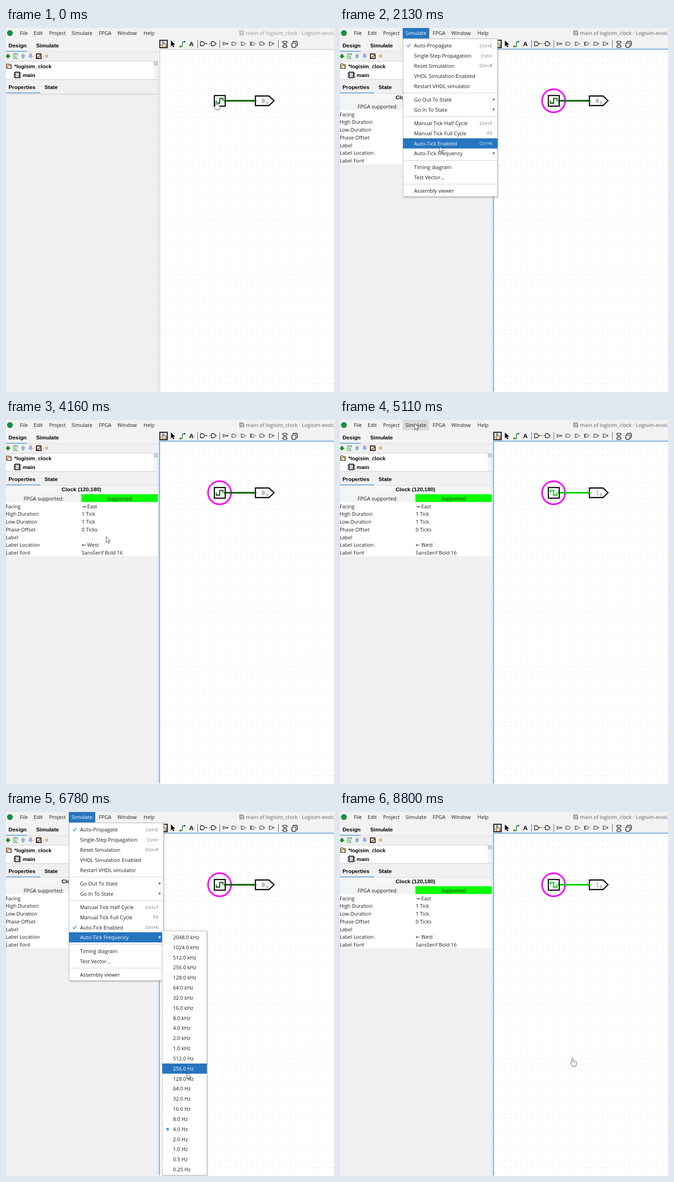
These frames come from a looping animation (711 by 787 pixels, 8870 ms). An HTML page with a canvas:

```html
<!DOCTYPE html>
<html lang="en">
<head>
<meta charset="utf-8">
<title>Clock simulation</title>
<style>
html, body { margin: 0; width: 100%; height: 100%; overflow: hidden; background: #f0f0f0; }
canvas { display: block; }
</style>
</head>
<body>
<canvas id="stage" width="711" height="787"></canvas>
<script>
const g = document.getElementById('stage').getContext('2d');
const LOOP = 8870;
const UI = '"Open Sans", "Noto Sans", "DejaVu Sans", sans-serif';
const BOLD = '"Liberation Sans", Arial, sans-serif';
const BLUE = '#2675bf', FOCUS = '#89b7e0', ROW = 21.83;

// Cursor path: time, x, y
const PATH = [
  [0, 455, 159], [660, 455, 159], [1190, 230, 35], [1400, 180, 6], [1530, 166, 2], [1600, 168, 3],
  [1810, 168, 3], [2000, 200, 150], [2130, 216, 256], [2300, 222, 270], [2540, 221, 268],
  [2690, 217, 252], [4620, 217, 252], [5110, 162, 8], [5240, 162, 8], [5440, 176, 98],
  [5700, 195, 190], [6030, 218, 269], [6370, 229, 271], [6570, 340, 280], [6780, 392, 564],
  [6920, 390, 622], [7200, 388, 633], [7660, 386, 635], [7930, 500, 590], [8100, 558, 548],
  [8270, 504, 532], [LOOP, 504, 532]
];
const FAST_TICKS = [7730, 7800, 7870, 7930, 8070, 8130, 8200, 8270, 8470, 8540, 8600, 8670, 8800];

const MENUS = [['File', 30], ['Edit', 60], ['Project', 93.5], ['Simulate', 142], ['FPGA', 201], ['Window', 241.5], ['Help', 298]];
// Label, row centre, shortcut ('>' opens a submenu)
const ITEMS = [
  ['Auto-Propagate', 38, 'Ctrl+E'], ['Single-Step Propagation', 60, 'Ctrl+I'],
  ['Reset Simulation', 81.5, 'Ctrl+R'], ['VHDL Simulation Enabled', 103.5, ''],
  ['Restart VHDL simulator', 125.5, ''], ['Go Out To State', 155, '>'], ['Go In To State', 176.5, '>'],
  ['Manual Tick Half Cycle', 206, 'Ctrl+T'], ['Manual Tick Full Cycle', 227.5, 'F9'],
  ['Auto-Tick Enabled', 249.5, 'Ctrl+K'], ['Auto-Tick Frequency', 271, '>'],
  ['Timing diagram', 301, ''], ['Test Vector...', 322.5, ''], ['Assembly viewer', 352, '']
];
const PROPS = [['Facing', '→ East'], ['High Duration', '1 Tick'], ['Low Duration', '1 Tick'],
  ['Phase Offset', '0 Ticks'], ['Label', ''], ['Label Location', '← West'], ['Label Font', 'SansSerif Bold 16']];

const ARROW = 'M0 0V12.8L3 10L5.2 14.8L7.3 13.9L5.2 9.3H9.3Z';
const HAND = 'M-1.6 10.5V1.5Q0 -1 1.5 1.5V7Q3 5.5 4 7.5Q5.5 6 6.5 8Q8.5 7.5 8.5 9.5V13Q8.3 15.5 7 17.8H0Q-2 15 -4.5 11.5Q-4.2 9 -1.6 10.5Z';
const AND = 'M0 -4H4Q9 -4 9 0T4 4H0Z';
const OR = 'M0 -4H3Q7 -3.5 9 0Q7 3.5 3 4H0Q3 0 0 -4Z';

function rect(x, y, w, h, color) {
  g.fillStyle = color;
  g.fillRect(x, y, w, h);
}
function frame(x, y, w, h, color, width = 1) {
  g.strokeStyle = color;
  g.lineWidth = width;
  g.strokeRect(x, y, w, h);
}
function text(s, x, y, size = 11.1, color = '#1c1c1c', align = 'left', family = UI, weight = '') {
  g.font = `${weight} ${size}px ${family}`;
  g.fillStyle = color;
  g.textAlign = align;
  g.fillText(s, x, y);
}
const bold = (s, x, y, align, size = 11.8) => text(s, x, y, size, '#000', align, BOLD, 'bold');
function shape(d, x, y, fill, stroke, width = 1, scale = 1) {
  const p = new Path2D(d);
  g.save();
  g.translate(x, y);
  g.scale(scale, scale);
  if (fill) { g.fillStyle = fill; g.fill(p); }
  if (stroke) { g.strokeStyle = stroke; g.lineWidth = width; g.stroke(p); }
  g.restore();
}
function disc(x, y, r, fill, stroke, width = 1) {
  g.beginPath();
  g.arc(x, y, r, 0, 7);
  if (fill) { g.fillStyle = fill; g.fill(); }
  if (stroke) { g.strokeStyle = stroke; g.lineWidth = width; g.stroke(); }
}

function cursorAt(t) {
  const i = PATH.findIndex(p => p[0] > t);
  const [t0, x0, y0] = PATH[i - 1], [t1, x1, y1] = PATH[i];
  const k = (t - t0) / (t1 - t0);
  return { x: x0 + (x1 - x0) * k, y: y0 + (y1 - y0) * k };
}
function levelAt(t) {
  if (t < 2910) return t >= 200 && t < 660;
  if (t < 7730) return Math.floor((t - 2910) / 250) % 2 === 0;
  return FAST_TICKS.filter(x => x <= t).length % 2 === 1;
}

function drawMenuBar(active, open, hover) {
  disc(8.5, 11, 6.3, '#16913c');
  if (open || hover) rect(136, 0, 57.5, 22.5, open ? BLUE : '#dadada');
  for (const [label, x] of MENUS) text(label, x, 15, 11.1, open && label === 'Simulate' ? '#fff' : '#1c1c1c');
  const tone = active ? '#606060' : '#949494';
  shape('M.5 .5H8L9.5 2V9.5H.5ZM2.5 .5V3.5H7V.5M2.5 9.5V6H7.5V9.5', 506, 5.5, null, tone);
  text('main of logisim_clock · Logisim-evolution', 520, 15, 11.3, tone);
}

function drawToolbar() {
  frame(333.5, 26.5, 16, 16, '#000', 2);
  shape(HAND, 340.5, 28, '#f5cfa0', '#222', 1.2, .78);
  shape(ARROW, 357.5, 27, '#000', null, 1, 1);
  shape('M0 10H5V0H10', 377.5, 30, null, '#00a000', 1.5);
  rect(376, 38.5, 3.5, 3, '#008000');
  rect(385.5, 28, 3, 3.5, '#2050d0');
  bold('A', 397, 39, 'left', 13.5);
  for (const x of [415, 463, 590]) rect(x, 26, 1, 17, '#555');
  shape('M0 -4.5H5L10 0L5 4.5H0Z', 421.5, 34, '#fff', '#111', 1.3);
  rect(431, 33.2, 6, 1.6, '#00a000');
  rect(441, 33.2, 4, 1.6, '#00a000');
  shape('M0 -4.5H5L10 0L5 4.5H0Z', 445.5, 34, '#fff', '#111', 1.3);
  const gates = [['M0 -3.5L7.5 0L0 3.5Z', 471, 1], [AND, 490], [OR, 510], [OR, 531], [AND, 550.5, 1], [OR, 570.5, 1]];
  gates.forEach(([d, x, inverted], i) => {
    shape('M-2 -2H1M-2 2H1M8 0H11', x, 34, null, '#555', .8);
    shape(d, x, 34, '#fff', '#111', 1.1, .9);
    if (inverted) disc(x + 8.8, 34, 1.4, '#fff', '#111');
    if (i === 3) shape('M-2 -4Q1 0 -2 4', x, 34, null, '#111');
  });
  shape('M3 0H10V5H3ZM3 8H10V14H3ZM0 2H3M10 2H13M0 11H3M10 11H13M6.5 5V8', 598, 28.5, '#fff', '#111', 1.1);
  shape('M1 5H9V14H1ZM3 5V2H12V11H9M5 2V0M8 2V0M11 2V0M12 5H14M12 8H14M-1 8H1M-1 11H1M3 14V16M6 14V16', 619, 27.5, '#fff', '#111', 1.2);
}

function drawExplorer() {
  rect(0, 51, 329, 1, '#dcdcdc');
  rect(0, 49, 45, 2.5, FOCUS);
  bold('Design', 5.5, 42);
  bold('Simulate', 65.5, 42);
  rect(0, 59.3, 9, 3.2, '#008a00');
  rect(2.6, 56, 3.2, 9.6, '#008a00');
  text('VH', 14.5, 60, 8.3, '#087808', 'left', BOLD);
  text('DL', 15.5, 67, 8.3, '#087808', 'left', BOLD);
  const up = 'M0 -4.7L4.3 0H2V4.5H-2V0H-4.3Z';
  shape(up, 37, 60.5, '#9db0f0', '#7f93d8');
  g.save();
  g.translate(53.5, 60.5);
  g.rotate(Math.PI);
  shape(up, 0, 0, '#9db0f0', '#7f93d8');
  g.restore();
  frame(66, 56, 10, 10, '#000', 1.8);
  shape('M67.5 64.5L75.5 56.5', 0, 0, null, '#d08a30', 2.2);
  shape('M68 66L76.5 57.5', 0, 0, null, '#222', .9);
  shape('M-3 -3L3 3M3 -3L-3 3', 88, 60.5, null, '#f0a78c', 2.8);

  rect(0, 72, 329, 40, '#fff');
  rect(0, 71.5, 329, 1, '#d0d0d0');
  rect(0, 111, 329, 1, '#c8c8c8');
  rect(320, 72, 9, 39, '#f3f3f3');
  rect(320, 72, 9, 9, '#cdcdcd');
  shape('M.5 1.5H6L7.5 3H11V11.5H.5Z', .5, 76, '#f6d9a0', '#3a2a10', 1.2);
  shape('M0 -4H4Q9 -4 9 0T4 4H0Z', 4, 84, '#fff', '#111', 1, .8);
  bold('*logisim_clock', 18, 87, 'left', 11.5);
  frame(19.5, 95.5, 10, 12, '#000', 1.8);
  for (let y = 97; y < 108; y += 4) { rect(16.5, y, 3, 1.3, '#000'); rect(30, y, 3, 1.3, '#000'); }
  disc(25, 101, 3.5, '#eef', '#555');
  shape('M27.5 104L31.5 108.5', 0, 0, null, '#9a5a20', 2);
  bold('main', 36, 106);
  bold('Properties', 5.5, 132);
  bold('State', 83.5, 132);
  rect(0, 141, 329, 1, '#dcdcdc');
  rect(0, 139, 74, 2.5, FOCUS);
  rect(0, 143, 329, 1, '#cfcfcf');
  rect(329, 72, 1, 715, '#d8d8d8');
}

function drawProperties() {
  rect(0, 142, 329, 18.5, '#f5f5f5');
  bold('Clock (120,180)', 163.5, 154, 'center');
  rect(0, 160.5, 163.5, 17, '#f2f3f3');
  rect(163.5, 160.5, 165.5, 17, '#00ff00');
  text('FPGA supported:', 81.5, 174, 11, '#1c1c1c', 'center');
  text('Supported', 246, 174, 11, '#1c1c1c', 'center');
  rect(0, 177.5, 329, 117, '#fff');
  PROPS.forEach(([name, value], i) => {
    const y = 190.7 + i * 16.75;
    text(name, -1, y, 11);
    text(value, 164, y, 11);
  });
}

function drawCircuit(high, active) {
  rect(333, 46, 378, 741, '#fff');
  for (let row = 0; row < 63; row++)
    for (let col = 0; col < 33; col++)
      rect(Math.round(333.6 + col * 11.75), Math.round(51.4 + row * 11.75), 1, 1, row % 10 === 1 ? '#8c8c8c' : '#c4c4c4');
  const edge = active ? FOCUS : '#c4c4c4', w = active ? 2.5 : 1;
  rect(334 - w, 47 - w, 380, w, edge);
  rect(334 - w, 47 - w, w, 741, edge);

  const wire = high ? '#00d200' : '#006400', dir = high ? 1 : -1;
  if (active) disc(463, 157.3, 25, null, '#ff00ff', 3.5);
  rect(474, 155.5, 67, 3.6, wire);
  disc(475, 157.3, 2.4, wire);
  disc(535.5, 157.3, 2.3, wire);
  frame(451.7, 146, 23.5, 23, '#000', 2.4);
  shape(`M-7.2 0V${-5.2 * dir}H0V${5.2 * dir}H7.2V0`, 463.2, 157.3, null, wire, 2.3);
  shape('M540.7 147H570L581 157.3L570 167.7H540.7Z', 0, 0, '#fff', '#000', 2.4);
  disc(541, 157.3, 1.8, wire);
  text(high ? '1' : '0', 557.8, 162, 12, high ? '#7a7f98' : '#777', 'center', '"Noto Sans Mono", monospace');
  text('b', 563.7, 165.3, 8.5, '#3f5fa8');
}

function popup(x, y, w, h) {
  rect(x + 2, y + 2, w, h + 1, 'rgba(0,0,0,.12)');
  rect(x, y, w, h, '#fff');
  frame(x + .5, y + .5, w - 1, h - 1, '#aeaeae');
}

function drawMenu(cursor, ticking, submenu) {
  const inSub = submenu && cursor.x > 339;
  popup(136, 23, 206, 342);
  for (const y of [140, 191, 286, 337]) rect(137, y, 204, 1, '#cfcfcf');
  for (const [label, y, key] of ITEMS) {
    const on = inSub ? label === 'Auto-Tick Frequency' : cursor.y > 24 && Math.abs(cursor.y - y) < ROW / 2;
    if (on) rect(136.5, y - 11, 205, 22, BLUE);
    text(label, 160.5, y + 4, 11.2, on ? '#fff' : '#1c1c1c');
    if (key === '>') shape('M0 -3.3L4.5 0L0 3.3Z', 331.5, y - .5, on ? '#fff' : '#6e6e6e');
    else text(key, 330, y + 3.5, 9.8, on ? '#e4eef8' : '#707070', 'right');
    if (label === 'Auto-Propagate' || (ticking && label === 'Auto-Tick Enabled'))
      shape('M0 0L2.7 3L7.5 -3.5', 145, y, null, on ? '#fff' : '#2e8fe6', 1.6);
  }
  if (!submenu) return;
  popup(338, 256.5, 98, 529.5);
  for (let i = 0; i < 24; i++) {
    const y = 271 + i * ROW, value = 2 ** (i < 12 ? 11 - i : 21 - i);
    const on = inSub && Math.floor((cursor.y - 260.1) / ROW) === i;
    if (on) rect(339, y - 11, 96.5, 22, BLUE);
    if (i === 19) disc(350.3, y, 2.9, '#3c9cf0');
    text(`${value === .25 ? value : value.toFixed(1)} ${i < 12 ? 'kHz' : 'Hz'}`, 362, y + 4, 11.1, on ? '#fff' : '#1c1c1c');
  }
}

function draw(t) {
  const cursor = cursorAt(t), active = t >= 60;
  const open = (t >= 1480 && t < 2750) || (t >= 5240 && t < 7660);
  const submenu = (t >= 2410 && t < 2610) || (t >= 6170 && t < 7660);
  const hover = cursor.y < 23 && cursor.x > 136 && cursor.x < 193;
  rect(0, 0, 711, 787, '#f0f0f0');
  rect(0, 0, 711, 52, '#f2f2f2');
  drawMenuBar(active, open, hover);
  drawToolbar();
  drawExplorer();
  if (active) drawProperties();
  drawCircuit(levelAt(t), active);
  if (open) drawMenu(cursor, t >= 2750, submenu);
  const poking = !open && cursor.x > 333 && cursor.y > 47;
  shape(poking ? HAND : ARROW, cursor.x, cursor.y, '#fff', '#444');
}

const start = performance.now();
function tick() {
  draw((performance.now() - start) % LOOP);
  requestAnimationFrame(tick);
}
tick();
</script>
</body>
</html>
```
